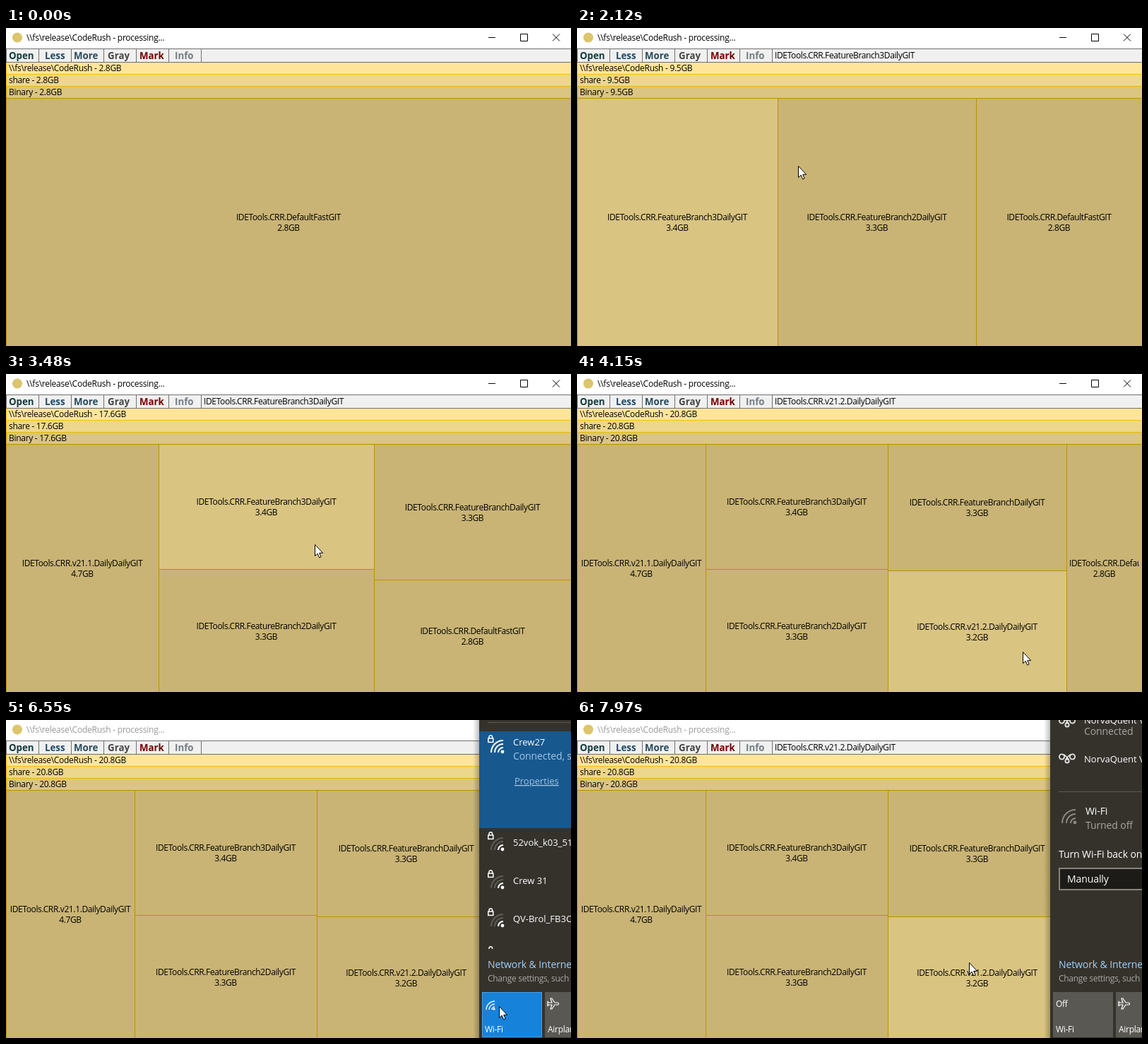
An HTML page that plays this animation: 800x450 px, repeating every 8 s.

```html
<!DOCTYPE html>
<html lang="en">
<head>
<meta charset="utf-8">
<title>Disk usage treemap</title>
<style>
  html, body { margin: 0; width: 100%; height: 100%; overflow: hidden; background: #fff; }
  #stage { display: block; width: 100vw; height: 100vh; }
  text { font: 12px "Open Sans", "Noto Sans", sans-serif; letter-spacing: -.3px; white-space: pre; }
  .title { letter-spacing: -.24px; }
  .tool { font-size: 13.3px; font-weight: 700; letter-spacing: 0; }
  .cell text, #hint { letter-spacing: -.38px; }
  .cell rect { fill: #c9b475; stroke: #bf9000; }
  .cell.hot rect { fill: #d9c482; }
  #chrome { fill: #000; stroke: #000; }
  #chrome text { stroke: none; }
  #chrome path { fill: none; }
  #chrome.idle { fill: #999; stroke: #999; }
  #flyout text { fill: #fff; }
  #flyout .big { font-size: 14px; letter-spacing: -.1px; }
  #flyout .name { font-size: 13px; letter-spacing: 0; }
  #flyout .dim { fill: #a9a7a3; }
  #flyout .pale { fill: #a5c5e0; }
  #flyout .link { fill: #9fd2fa; }
</style>
</head>
<body>
<svg id="stage" viewBox="0 0 800 450" preserveAspectRatio="none">
  <defs>
    <linearGradient id="shade">
      <stop offset="0" stop-opacity="0"/>
      <stop offset="1" stop-opacity=".25"/>
    </linearGradient>
    <clipPath id="listClip"><path d="M670 0H800V324H670Z"/></clipPath>
    <g id="lock" fill="none" stroke="#fff" stroke-width="1.5">
      <path d="M2 5V3A2.3 2.3 0 0 1 6.6 3V5"/>
      <rect x=".8" y="5" width="7" height="5.4"/>
    </g>
    <g id="vpn" fill="none" stroke="#e8e8e6" stroke-width="1.8">
      <circle cx="-7.5" cy="-1" r="3.6"/>
      <circle cx="7.5" cy="-1" r="3.6"/>
      <circle cy="5" r="2.6"/>
      <path d="M-5 -4Q-2 -3 2 3M5 -4Q2 -3 -2 3"/>
    </g>
  </defs>
  <rect width="800" height="450" fill="#fff"/>
  <g id="chrome">
    <text class="title" x="29" y="18">\\fs\release\CodeRush - processing...</text>
    <path d="M683 13.5H693M728.5 8.5H738.5V18.5H728.5ZM774 8.5L784 18.5M784 8.5L774 18.5"/>
  </g>
  <circle cx="16" cy="13.5" r="7" fill="#dcc56c"/>
  <g id="toolbar" stroke="#707070">
    <rect x=".5" y="29.5" width="800" height="19" fill="#f0f0f0"/>
  </g>
  <text id="hint" x="280" y="43"></text>
  <g id="maps"></g>
  <g id="tray">
    <rect x="793" y="359" width="7" height="91" opacity=".12"/>
    <rect x="796" y="361" width="4" height="89" fill="#3b3a38"/>
  </g>
  <g id="flyout">
    <rect x="661" width="9" height="900" fill="url(#shade)"/>
    <rect x="670" width="130" height="900" fill="#35322c"/>
    <g id="online" clip-path="url(#listClip)">
      <path d="M682 3.5H800" stroke="#5c5a56"/>
      <rect x="670" y="16" width="130" height="137" fill="#17588f"/>
      <text class="big pale" x="718" y="56">Connected, secured</text>
      <text class="name pale" x="720" y="91" text-decoration="underline">Properties</text>
    </g>
    <g id="offline">
      <use href="#vpn" x="694" y="2"/>
      <text class="name" x="718" y="5">NorvaQuent VPN</text>
      <text class="big dim" x="718" y="21">Connected</text>
      <use href="#vpn" x="694" y="53"/>
      <text class="name" x="718" y="60">NorvaQuent VPN</text>
      <path d="M682 101.5H800" stroke="#5c5a56"/>
      <text class="big" x="720" y="134">Wi-Fi</text>
      <text class="big dim" x="720" y="154">Turned off</text>
      <text class="big" x="682" y="195">Turn Wi-Fi back on</text>
      <rect x="683" y="210" width="130" height="30" fill="#1d1b18" stroke="#86837e" stroke-width="2"/>
      <text class="big" x="694" y="230">Manually</text>
    </g>
    <text class="big link" x="682" y="351">Network &amp; Internet settings</text>
    <text class="dim" x="682" y="370">Change settings, such as</text>
    <rect id="tile" x="674.5" y="385.5" width="84" height="63"/>
    <text id="off" x="678" y="406">Off</text>
    <text x="678" y="442">Wi-Fi</text>
    <rect x="763" y="385" width="40" height="64" fill="#5a5853"/>
    <path d="M768 400L773 400 771 394H773L777 400H781A1.5 1.5 0 0 1 781 403H777L773 409H771L773 403H768L767 405V398Z" fill="none" stroke="#fff" stroke-width="1.2"/>
    <text x="767" y="442">Airplane mode</text>
  </g>
  <path id="cursor" d="M.5 .5V16.5L4.2 13.2 6.7 18.9 9.1 17.8 6.7 12.3H11.6Z" fill="#fff" stroke="#000"/>
</svg>
<script>
const LOOP = 8000, DEACTIVATE = 4700, TRAY_OPEN = 5300, FLYOUT_OPEN = 5800, WIFI_OFF = 6750;
const HOVER_LAG = 90;

const $ = id => document.getElementById(id);
function add(parent, tag, attrs, content) {
  const node = document.createElementNS('http://www.w3.org/2000/svg', tag);
  for (const key in attrs) node.setAttribute(key, attrs[key]);
  if (content) node.textContent = content;
  return parent.appendChild(node);
}
const show = (node, on) => node.setAttribute('visibility', on ? 'visible' : 'hidden');

// Toolbar
const tools = [
  ['Open', 4, '#123b3d'], ['Less', 55, '#204a66'], ['More', 96, '#284b5c'],
  ['Gray', 144, '#464646'], ['Mark', 189, '#740000'], ['Info', 239, '#747d84']
];
tools.forEach(([name, x, fill], i) => {
  add($('toolbar'), 'text', { class: 'tool', x, y: 44, fill, stroke: 'none' }, name);
  add($('toolbar'), 'path', { d: `M${46 * (i + 1) + .5} 30V48` });
});

// Treemap: each column is [left edge, cell names, split height]
const sizes = {
  DefaultFast: 2.8, FeatureBranch2Daily: 3.3, FeatureBranch3Daily: 3.4,
  FeatureBranchDaily: 3.3, 'v21.1.DailyDaily': 4.7, 'v21.2.DailyDaily': 3.2
};
const branches = ['FeatureBranch3Daily', 'FeatureBranch2Daily'];
const scans = [
  { from: 0, total: 2.8, columns: [[0, ['DefaultFast']]] },
  { from: 400, total: 6.1, columns: [[0, ['FeatureBranch2Daily']], [436, ['DefaultFast']]] },
  { from: 1560, total: 9.5, columns: [[0, ['FeatureBranch3Daily']], [284, ['FeatureBranch2Daily']], [565, ['DefaultFast']]] },
  { from: 2650, total: 12.9, columns: [[0, branches, 276], [418, ['FeatureBranchDaily', 'DefaultFast'], 291]] },
  { from: 3050, total: 17.6, columns: [[0, ['v21.1.DailyDaily']], [216, branches, 276], [521, ['FeatureBranchDaily', 'DefaultFast'], 291]] },
  { from: 3900, total: 20.8, columns: [[0, ['v21.1.DailyDaily']], [182, branches, 276], [440, ['FeatureBranchDaily', 'v21.2.DailyDaily'], 278], [693, ['DefaultFast']]] }
];

function addCell(parent, name, left, top, right, bottom) {
  const label = `IDETools.CRR.${name}GIT`, width = right - left - 8;
  const node = add(parent, 'g', { class: 'cell' });
  add(node, 'rect', { x: left + .5, y: top + .5, width: right - left, height: bottom - top });
  const box = add(node, 'svg', { x: left + 4, y: 0, width, height: 450 });
  const y = Math.floor((top + bottom) / 2) - 2;
  const fits = label.length * 5.3 <= width;
  add(box, 'text', { x: fits ? width / 2 : 0, y, 'text-anchor': fits ? 'middle' : 'start' }, label);
  add(box, 'text', { x: width / 2, y: y + 15, 'text-anchor': 'middle' }, `${sizes[name]}GB`);
  return { node, label, left, top, right, bottom };
}

const rows = [['\\\\fs\\release\\CodeRush', '#ffe599', '#ffc000'], ['share', '#edd78d', '#efb400'], ['Binary', '#dac582', '#d6a200']];
for (const scan of scans) {
  scan.node = add($('maps'), 'g');
  rows.forEach(([name, fill, stroke], i) => {
    const y = 49 + 17 * i;
    add(scan.node, 'rect', { y, width: 800, height: 17, fill });
    add(scan.node, 'path', { d: `M.5 ${y}V${y + 16.5}H800`, fill: 'none', stroke });
    add(scan.node, 'text', { x: 4, y: y + 12 }, `${name} - ${scan.total}GB`);
  });
  scan.cells = scan.columns.flatMap(([left, names, split], i) => {
    const right = scan.columns[i + 1]?.[0] ?? 800;
    return names.map((name, j) =>
      addCell(scan.node, name, left, j ? split : 99, right, j || !split ? 450 : split));
  });
}

// Network list
function addSignal(parent, cx, cy, radii, colors, width) {
  radii.forEach((r, i) => add(parent, 'path', {
    d: `M${cx - r} ${cy}A${r} ${r} 0 0 1 ${cx} ${cy - r}`,
    fill: 'none', stroke: colors[i] || colors[0], 'stroke-width': width
  }));
  add(parent, 'circle', { cx: cx - 1, cy: cy - 1, r: width * 1.2, fill: colors[0] });
}
const networks = [['Crew27', 36], ['52vok_k03_51', 178], ['Crew 31', 232], ['QV-Brol_FB3C', 286], ['', 340]];
networks.forEach(([name, y], i) => {
  const faint = i ? '#5f5c57' : '#fff';
  add($('online'), 'use', { href: '#lock', x: 682, y: y - (i ? 20 : 15) });
  addSignal($('online'), 704, y + (i ? 6 : 10), [7, 12, 17], ['#fff', faint, faint], 2);
  add($('online'), 'text', { class: 'name', x: 718, y }, name);
});
addSignal($('offline'), 706, 146, [7, 13, 19], ['#8b8883'], 2);
const tileSignal = add($('flyout'), 'g');
addSignal(tileSignal, 692, 410, [4, 8, 12], ['#fff'], 1.3);

// Pointer path: [time, x, y]
const track = [
  [0, 340, 480], [480, 350, 480], [820, 425, 300], [1000, 500, 170], [1240, 556, 119],
  [1520, 500, 110], [1850, 190, 150], [2000, 240, 176], [2120, 313, 195], [2450, 350, 215],
  [3100, 410, 235], [3480, 437, 241], [3850, 500, 300], [4400, 740, 470], [6150, 740, 480],
  [6400, 700, 412], [6550, 698, 405], [6950, 698, 405], [7350, 680, 395], [7700, 580, 355],
  [7950, 555, 343], [8000, 555, 343]
];
function pointerAt(t) {
  const i = Math.max(1, track.findIndex(point => point[0] >= t));
  const [t0, x0, y0] = track[i - 1], [t1, x1, y1] = track[i];
  const k = (t - t0) / (t1 - t0);
  return [x0 + (x1 - x0) * k, y0 + (y1 - y0) * k];
}

function render(t) {
  const current = scans.filter(scan => scan.from <= t).pop();
  const [hx, hy] = pointerAt(Math.max(0, t - HOVER_LAG));
  const covered = t >= FLYOUT_OPEN && hx >= 670;
  let hint = '';
  for (const scan of scans) {
    scan.node.style.display = scan === current ? '' : 'none';
    if (scan !== current) continue;
    for (const cell of scan.cells) {
      const hot = !covered && hy < 450 && hx >= cell.left && hx < cell.right && hy >= cell.top && hy < cell.bottom;
      cell.node.classList.toggle('hot', hot);
      if (hot) hint = cell.label;
    }
  }
  $('hint').textContent = hint;
  $('chrome').classList.toggle('idle', t >= DEACTIVATE);

  show($('tray'), t >= TRAY_OPEN && t < FLYOUT_OPEN);
  const rise = Math.min(1, Math.max(0, (t - FLYOUT_OPEN) / 220));
  $('flyout').style.display = t >= FLYOUT_OPEN ? '' : 'none';
  $('flyout').setAttribute('transform', `translate(0 ${450 * (1 - rise) ** 3})`);

  const wifi = t < WIFI_OFF;
  show($('online'), wifi);
  show(tileSignal, wifi);
  show($('offline'), !wifi);
  show($('off'), !wifi);
  $('tile').setAttribute('fill', wifi ? '#1782da' : '#5a5853');
  $('tile').setAttribute('stroke', wifi ? '#4a9ee4' : '#5a5853');

  const [x, y] = pointerAt(t);
  $('cursor').setAttribute('transform', `translate(${Math.round(x)} ${Math.round(y)})`);
}

function tick() {
  render(performance.now() % LOOP);
  requestAnimationFrame(tick);
}
tick();
</script>
</body>
</html>
```
